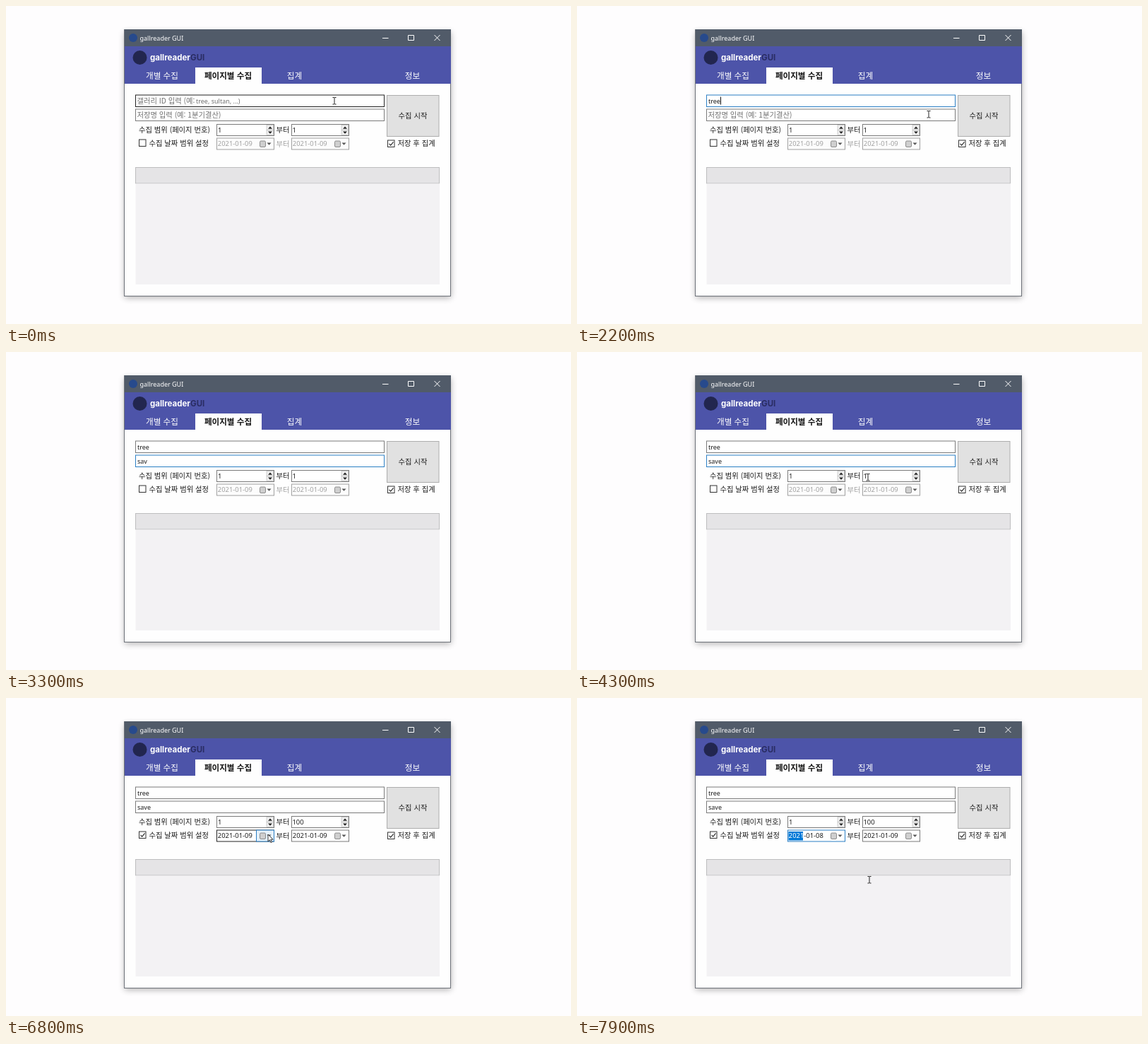
Write an HTML page that moves like this. It is 800 px wide and 450 px high and loops after 8 s.

```html
<!DOCTYPE html>
<html lang="ko">
<head>
<meta charset="utf-8">
<title>gallreader GUI</title>
<style>
  html, body { margin: 0; width: 100%; height: 100%; overflow: hidden; background: #fefdfe; }
  svg { display: block; width: 100%; height: 100%; }
  text { font: 10.3px "Noto Sans CJK KR", "Noto Sans CJK", sans-serif; fill: #1c1c1c; white-space: pre; }
  .latin { font: 9px "Noto Sans", "Open Sans", sans-serif; }
  .num { font: 9.4px "Noto Sans", "Open Sans", sans-serif; }
  .tab { font-size: 11.6px; fill: #fff; }
  .bold { font-weight: 700; fill: #151515; }
  .logo { font: 700 11.5px Inter, sans-serif; fill: #fff; }
  .hint { fill: #6f6f6f; }
  .mid { text-anchor: middle; }
  .box { fill: #fff; stroke: #7a7a7a; }
  .hover { stroke: #222; }
  .focus { stroke: #2b7fc4; }
  .line { fill: none; stroke: #fff; }
  .check { fill: none; stroke: #222; stroke-width: 1.1; }
  .btn { fill: #f0f0f0; stroke: #b5b5b5; stroke-width: .6; }
  .off .box { stroke: #a0a0a0; fill: #fcfcfc; }
  .off text { fill: #a0a0a0; }
  .off .icon, .off .drop { opacity: .45; }
  .icon { fill: #cfcfcf; stroke: #777; stroke-width: .8; }
  .drop { fill: #555; }
  .cal text { font-size: 8.6px; text-anchor: middle; }
</style>
</head>
<body>
<svg viewBox="0 0 800 450">
  <defs>
    <filter id="blur" x="-10%" y="-10%" width="120%" height="120%"><feGaussianBlur stdDeviation="5"/></filter>
    <g id="spin">
      <rect class="box" x=".5" y=".5" width="81" height="16"/>
      <rect class="btn" x="71" y="1.5" width="9.5" height="7"/>
      <rect class="btn" x="71" y="8.5" width="9.5" height="7"/>
      <path d="M73 6.8h6l-3-3.3zM73 10.4h6l-3 3.3z" fill="#222"/>
    </g>
    <g id="picker">
      <rect class="icon" x="61.5" y="4" width="8" height="8.5" rx="1.5"/>
      <path class="drop" d="M71.5 6.5h6l-3 3.2z"/>
    </g>
  </defs>

  <rect width="800" height="450" fill="#fefdfe"/>
  <rect x="168" y="37" width="462" height="376" fill="#000" opacity=".3" filter="url(#blur)"/>
  <rect x="167.5" y="33.5" width="462" height="377" fill="#fefefe" stroke="#6c7078"/>
  <rect x="168" y="33" width="462" height="24" fill="#515b69"/>
  <circle cx="180" cy="45" r="6" fill="#274a8c"/>
  <text class="latin" x="189.5" y="48.5" style="fill:#fff">gallreader GUI</text>
  <path class="line" d="M533 45.5h8.500M569.500 41.500h8v7h-8zM606.500 41l8 8m0-8l-8 8"/>

  <rect x="168" y="57" width="462" height="53" fill="#4d54a9"/>
  <circle cx="189.500" cy="73" r="10" fill="#22264f"/>
  <text class="logo" x="204" y="77">gallreader<tspan fill="#2a2d63">GUI</tspan></text>
  <rect x="268" y="87" width="94" height="23" fill="#fefefe"/>
  <text class="tab mid" x="221" y="103">개별 수집</text>
  <text class="tab mid bold" x="314.500" y="103">페이지별 수집</text>
  <text class="tab mid" x="408.500" y="103">집계</text>
  <text class="tab mid" x="575.500" y="103">정보</text>

  <rect id="entry1" class="box" x="183.500" y="126" width="352" height="16.500"/>
  <text id="hint1" class="hint" x="185.500" y="137.800">갤러리 ID 입력 (예:<tspan class="latin" x="269">tree, sultan, ...)</tspan></text>
  <text id="text1" class="latin" x="186" y="137.500"></text>
  <rect id="entry2" class="box" x="183.500" y="146" width="352" height="16.500"/>
  <text id="hint2" class="hint" x="185.500" y="157.800">저장명 입력 (예: 1분기결산)</text>
  <text id="text2" class="latin" x="186" y="157.500"></text>
  <rect x="539.500" y="126.500" width="73.500" height="58" fill="#e1e1e1" stroke="#adadad"/>
  <text class="mid" x="576" y="159.300">수집 시작</text>

  <text x="188" y="178.800">수집 범위 (페이지 번호)</text>
  <use href="#spin" x="298" y="167"/>
  <text class="num" x="300" y="178.700">1</text>
  <text class="mid" x="392" y="178.800">부터</text>
  <use href="#spin" x="404" y="167"/>
  <rect id="pick" x="405.500" y="169.500" width="6" height="12" fill="#0078d7"/>
  <text id="pages" class="num" x="405.500" y="178.700">1</text>

  <rect class="box" x="188.500" y="189" width="9.500" height="9.500" style="stroke:#333"/>
  <path id="tick" class="check" d="M190.500 193.800l2.200 2.300 3.800-4.800"/>
  <text x="202.500" y="197.800">수집 날짜 범위 설정</text>
  <g id="dates">
    <rect id="date1" class="box" x="298.500" y="187" width="81" height="16"/>
    <rect id="lit" x="354.500" y="187" width="25" height="16" fill="#e5f1fb" stroke="#2b7fc4"/>
    <rect id="year" x="299.500" y="189" width="20.500" height="12.500" fill="#0078d7"/>
    <text class="num" x="299.800" y="198.300"><tspan id="yearText">2021</tspan><tspan id="day">-01-09</tspan></text>
    <use href="#picker" x="298" y="187"/>
    <text class="mid" x="392" y="198.500">부터</text>
    <rect class="box" x="404.500" y="187" width="81" height="16"/>
    <text class="num" x="405.800" y="198.300">2021-01-09</text>
    <use href="#picker" x="404" y="187"/>
  </g>
  <rect class="box" x="540.500" y="190" width="9.500" height="9.500" style="stroke:#333"/>
  <path class="check" d="M542.500 194.800l2.200 2.300 3.800-4.800"/>
  <text x="554.500" y="198.300">저장 후 집계</text>

  <rect x="183.500" y="228.500" width="430" height="22.500" fill="#e5e4e6" stroke="#bdbdbf"/>
  <rect x="183.500" y="251.500" width="430.500" height="142.500" fill="#f3f2f4"/>

  <g id="cal" class="cal">
    <rect x="298.500" y="203.500" width="154" height="128" fill="#fff" stroke="#7a7a7a"/>
    <rect x="299" y="204" width="153" height="22" fill="#0078d7"/>
    <path d="M310 211v8l-5-4zM441 211v8l5-4z" fill="#fff"/>
    <text class="bold" x="375" y="218.300" style="fill:#fff">1월  2021</text>
    <rect x="299" y="226" width="153" height="15" fill="#f5f5f5"/>
    <g id="cells"></g>
  </g>

  <path id="caret" stroke="#111" d="M0 0v11"/>
  <g id="mouse">
    <path id="beam" fill="none" stroke="#222" d="M-2.500-4.500h2l.5.500.5-.5h2M0-4v8.500M-2.500 5h2l.5-.5.5.5h2"/>
    <path id="arrow" fill="#fff" stroke="#222" stroke-width=".9" d="M0 0v10l2.300-2.200 1.700 3.800 1.600-.7-1.700-3.700h3.200z"/>
  </g>
</svg>
<script>
const LOOP = 8000, STEP = 100;
const el = id => document.getElementById(id);
const show = (id, on) => el(id).style.display = on ? '' : 'none';

// pointer path: time, x, y
const path = [
  [0, 465, 134], [300, 465, 134], [600, 650, 180], [900, 791, 218], [1000, 747, 211],
  [1800, 747, 211], [2200, 498, 153], [2600, 498, 153], [2800, 554, 186], [3600, 554, 186],
  [4300, 412, 177], [5000, 412, 177], [5400, 417, 180], [5600, 417, 180], [6000, 193, 194],
  [6300, 193, 194], [6700, 371, 193], [7000, 371, 193], [7500, 416, 258],
  [7700, 416, 258], [7900, 414, 257]
];

function pointer(t) {
  const i = path.findIndex(p => p[0] > t);
  if (i < 0) return path[path.length - 1].slice(1);
  const a = path[i - 1], b = path[i];
  const u = (t - a[0]) / (b[0] - a[0]), k = u * u * (3 - 2 * u);
  return [a[1] + (b[1] - a[1]) * k, a[2] + (b[2] - a[2]) * k];
}

const inside = (x, y, l, t, r, b) => x >= l && x <= r && y >= t && y <= b;
const within = (t, a, b) => t >= a && t < b;
const typed = (word, t, start) => word.slice(0, Math.max(0, Math.floor((t - start) / STEP) + 1));

function overText(x, y, open) {
  return inside(x, y, 184, 126, 535, 162) || inside(x, y, 299, 167, 368, 184) ||
    inside(x, y, 404, 167, 474, 184) || (!open && inside(x, y, 184, 251, 614, 394));
}

function buildCalendar() {
  const ns = 'http://www.w3.org/2000/svg', w = 153 / 7;
  const add = (tag, attrs, label) => {
    const node = document.createElementNS(ns, tag);
    for (const k in attrs) node.setAttribute(k, attrs[k]);
    if (label !== undefined) node.textContent = label;
    el('cells').append(node);
  };
  [...'일월화수목금토'].forEach((name, c) => {
    const x = 299 + (c + .5) * w, red = c % 6 ? '#1c1c1c' : '#e00000';
    add('text', { x, y: 236.5, style: 'fill:' + red }, name);
    for (let r = 0; r < 6; r++) {
      const n = r * 7 + c - 4, top = 241 + r * 15;
      const date = new Date(2021, 0, n);
      if (n === 9) add('rect', { x: x - w / 2, y: top, width: w, height: 15, fill: '#0078d7' });
      const color = n === 9 ? '#fff' : date.getMonth() ? '#9a9a9a' : red;
      add('text', { x, y: top + 10.6, style: 'fill:' + color }, date.getDate());
    }
  });
}

function setBorder(id, focused, hovered) {
  el(id).setAttribute('class', 'box' + (focused ? ' focus' : hovered ? ' hover' : ''));
}

function placeCaret(t) {
  const fields = [['text1', 200, 2500, 128.5, 1200], ['text2', 2500, 4600, 148.5, 2600], ['pages', 4900, 6200, 169.5, 5000]];
  const field = fields.find(f => within(t, f[1], f[2]));
  const lit = field && (t - field[4] + 2000) % 1000 < 600;
  show('caret', lit);
  if (!lit) return;
  const node = el(field[0]);
  const width = node.textContent ? node.getComputedTextLength() : 0;
  el('caret').setAttribute('transform', `translate(${Math.round(+node.getAttribute('x') + width) + .5} ${field[3]})`);
}

function render(t) {
  const [x, y] = pointer(t);
  const open = within(t, 7000, 7800), chosen = t >= 7800;

  const first = typed('tree', t, 1400), second = typed('save', t, 3100);
  el('text1').textContent = first;
  el('text2').textContent = second;
  show('hint1', t < 200);
  show('hint2', t < 2500);
  setBorder('entry1', within(t, 200, 2500), inside(x, y, 184, 126, 535, 143));
  setBorder('entry2', within(t, 2500, 4600), t > 2200 && inside(x, y, 184, 146, 535, 163));

  const selected = within(t, 4700, 5000);
  el('pages').textContent = t < 5000 ? '1' : typed('100', t, 5000);
  el('pages').style.fill = selected ? '#fff' : '';
  show('pick', selected);

  const enabled = t >= 6200;
  show('tick', enabled);
  el('dates').setAttribute('class', enabled ? '' : 'off');
  const hot = enabled && inside(x, y, 354, 187, 380, 203);
  show('lit', hot || open);
  setBorder('date1', chosen, enabled && (open || inside(x, y, 298, 187, 380, 203)));
  show('year', chosen);
  el('yearText').style.fill = chosen ? '#fff' : '';
  el('day').textContent = chosen ? '-01-08' : '-01-09';
  show('cal', open);

  placeCaret(t);
  const beam = overText(x, y, open);
  show('beam', beam);
  show('arrow', !beam);
  show('mouse', !within(t, 1400, 1800) && !within(t, 3100, 3600));
  el('mouse').setAttribute('transform', `translate(${Math.round(x)} ${Math.round(y)})`);
}

buildCalendar();
function tick(now) {
  render(Math.floor(now % LOOP / STEP) * STEP);
  requestAnimationFrame(tick);
}
render(0);
requestAnimationFrame(tick);
</script>
</body>
</html>
```
